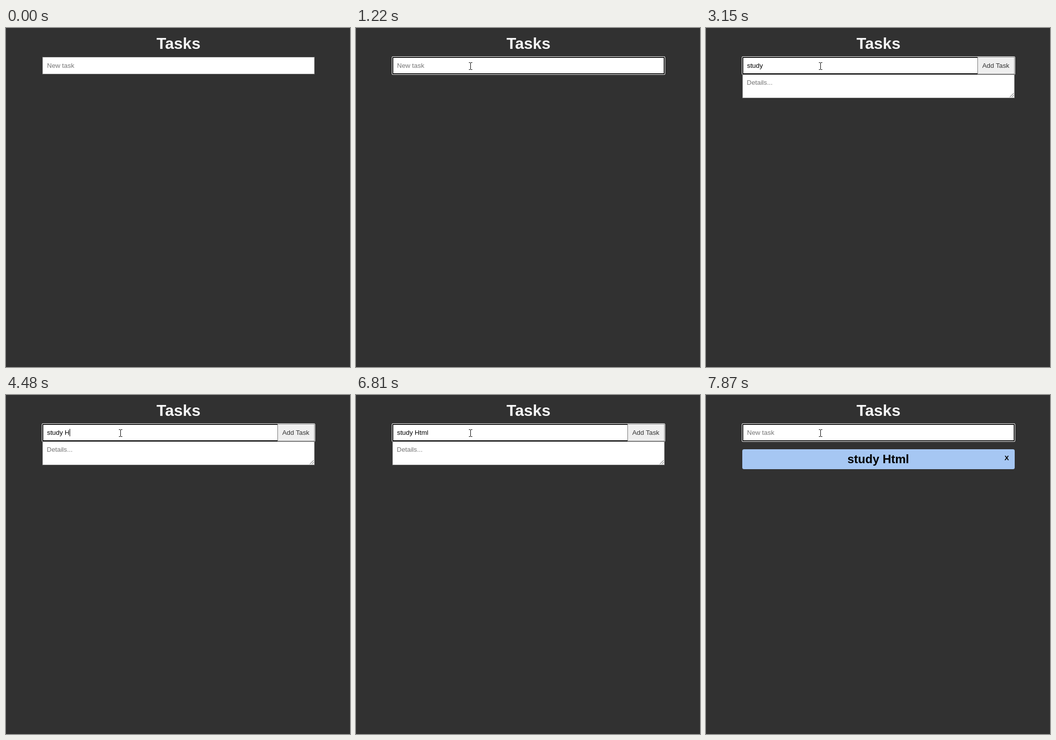
These frames come from a looping animation (692 by 681 pixels, 8 s). An HTML page:

```html
<!DOCTYPE html>
<html lang="en">
<head>
<meta charset="utf-8">
<title>Tasks</title>
<style>
  html, body { margin: 0; height: 100%; overflow: hidden; background: #313131; }
  svg { display: block; font: 13.333px Arial, "Liberation Sans", sans-serif; }
  rect { shape-rendering: crispEdges; }
  .round { shape-rendering: auto; }
  .hint { fill: #757575; }
  .bold { font-weight: bold; text-anchor: middle; }
</style>
</head>
<body>
<svg width="692" height="681" viewBox="0 0 692 681">
  <text class="bold" x="347" y="42" font-size="32" fill="#f5f5f5">Tasks</text>

  <rect id="field" x="73.5" y="58.5" width="547" height="34" fill="#fff"/>
  <g id="ring">
    <rect class="round" x="72" y="57" width="550" height="37" rx="2.5" fill="#fff"/>
    <rect class="round" x="73" y="58" width="548" height="35" rx="1.5" fill="#101010"/>
    <rect x="75" y="60" width="544" height="31" fill="#fff"/>
  </g>
  <text id="hint" class="hint" x="82.5" y="80">New task</text>
  <text id="typed" x="82.5" y="80"></text>
  <rect id="caret" y="68" width="1" height="15"/>

  <g id="form">
    <rect x="546.5" y="58.5" width="74" height="34" fill="#efefef" stroke="#767676"/>
    <text x="583" y="80" text-anchor="middle" fill="#333">Add Task</text>
    <rect x="73.5" y="93.5" width="547" height="47" fill="#fff" stroke="#767676"/>
    <text class="hint" x="82" y="114">Details...</text>
    <path d="M611 139l8-8M615 139l4-4" stroke="#555"/>
  </g>

  <g id="task">
    <rect class="round" x="73" y="109" width="548" height="40" rx="3.5" fill="#a6c7f3"/>
    <text class="bold" x="346.5" y="137" font-size="24">study Html</text>
    <text class="bold" x="605" y="131">X</text>
  </g>

  <path id="arrow" d="M.5 .5v16l3.7-3.6 2.5 5.6 2.4-1-2.4-5.5h5z" fill="#fff" stroke="#000"/>
  <path id="beam" d="M-3 -6.5h3M1 -6.5h3M.5 -6v13M-3 7.5h3M1 7.5h3" stroke="#000"/>
  <circle id="click" cx="228" cy="75" r="15" fill="#ff0" opacity=".52"/>
</svg>
<script>
const LOOP = 8000, FOCUS = 690, SUBMIT = 6880;
const CLICK = [614, 750];
const TEXT = "study Html";
const KEYS = [1620, 1880, 2020, 2480, 2610, 3490, 4480, 4950, 5080, 5210];
const BLINKS = [1220, 3150, 4020, 5750, 6270, 6810, 7340, 7870];

const el = id => document.getElementById(id);
const show = (id, on) => el(id).setAttribute("visibility", on ? "visible" : "hidden");
const place = (id, x, y) => el(id).setAttribute("transform", `translate(${x} ${y})`);

const pen = document.createElement("canvas").getContext("2d");
pen.font = '13.333px Arial, "Liberation Sans", sans-serif';

// Each key press shows the caret; each blink after it flips it.
function caretOn(t) {
  const start = KEYS.filter(k => k <= t).pop() ?? FOCUS;
  return t >= FOCUS && BLINKS.filter(b => b > start && b <= t).length % 2 === 0;
}

function drawPointer(t) {
  const step = Math.floor((t - 70) / 68);
  const rest = (1 - Math.min(1, Math.max(0, step / 7))) ** 2;
  const x = Math.round(230 + 130 * rest), y = Math.round(76 + 496 * rest);
  const inField = y < 93;
  show("arrow", t >= 70 && !inField);
  show("beam", t >= 70 && inField);
  place("arrow", x, y);
  place("beam", x, y);
  show("click", t >= CLICK[0] && t < CLICK[1]);
  el("field").setAttribute("stroke", t >= 70 && inField ? "#4f4f4f" : "#767676");
}

function draw(t) {
  const count = t < SUBMIT ? KEYS.filter(k => k <= t).length : 0;
  const typed = TEXT.slice(0, count);
  show("ring", t >= FOCUS);
  show("hint", !count);
  show("form", count > 0);
  show("task", t >= SUBMIT);
  el("typed").textContent = typed;
  show("caret", caretOn(t));
  el("caret").setAttribute("x", Math.round(82.5 + pen.measureText(typed).width));
  drawPointer(t);
}

const began = performance.now();
function tick() {
  draw((performance.now() - began) % LOOP);
  requestAnimationFrame(tick);
}
tick();
</script>
</body>
</html>
```
